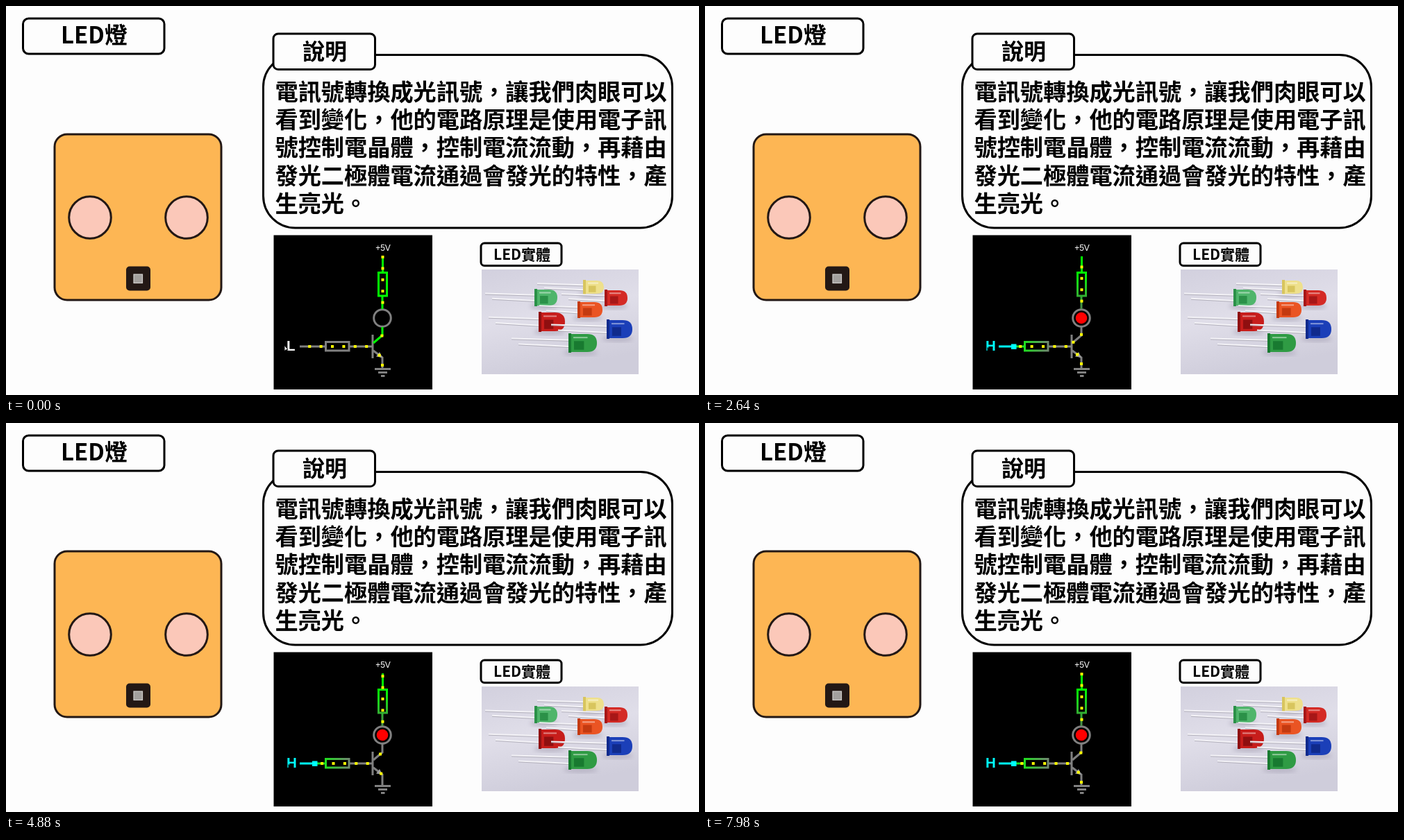
Recreate the animation shown at these times as an HTML page. Size 998x561 px, loop 8 s.

```html
<!DOCTYPE html>
<html lang="zh-TW">
<head>
<meta charset="utf-8">
<style>
html, body { margin: 0; width: 100%; height: 100%; overflow: hidden; background: #fdfdfd; }
svg { display: block; width: 100%; height: 100%; }
.cjk { font-family: "Noto Sans CJK TC", "Noto Sans CJK", sans-serif; font-weight: 700; }
.box { fill: #fdfdfd; stroke: #000; stroke-width: 3; }
.face { stroke: #231815; stroke-width: 3; }
.wire { fill: none; stroke-width: 3; }
.grey { stroke: #808080; }
.sim { font-family: "Liberation Sans", Arial, sans-serif; }
</style>
</head>
<body>
<svg viewBox="0 0 998 561" preserveAspectRatio="none">
  <defs>
    <linearGradient id="drop" gradientUnits="userSpaceOnUse" x1="0" y1="384" x2="0" y2="437">
      <stop offset="0" stop-color="#0f0"/><stop offset=".6" stop-color="#2fb52f"/><stop offset="1" stop-color="#4c8a4c"/>
    </linearGradient>
    <linearGradient id="base" gradientUnits="userSpaceOnUse" x1="460" y1="0" x2="494" y2="0">
      <stop offset="0" stop-color="#1fe01f"/><stop offset="1" stop-color="#708870"/>
    </linearGradient>
    <linearGradient id="table" x1="0" y1="0" x2=".3" y2="1">
      <stop offset="0" stop-color="#d2d0de"/><stop offset=".5" stop-color="#e0dee9"/><stop offset="1" stop-color="#cfcddb"/>
    </linearGradient>
    <filter id="soft"><feGaussianBlur stdDeviation="3"/></filter>
    <clipPath id="photoClip"><path d="M685 380H911V531H685Z"/></clipPath>
  </defs>

  <rect width="998" height="561" fill="#fdfdfd"/>
  <rect class="box" x="24.5" y="18" width="203.5" height="51" rx="8"/>
  <text class="cjk" x="79" y="54" font-size="33">LED燈</text>

  <rect class="face" x="70" y="185" width="240" height="239" rx="18" fill="#fdb654"/>
  <circle class="face" cx="121" cy="305" r="30.3" fill="#fbc8b9"/>
  <circle class="face" cx="260" cy="305" r="30.3" fill="#fbc8b9"/>
  <rect x="173" y="375.5" width="35" height="35" rx="5" fill="#231815"/>
  <rect x="184" y="387" width="12.5" height="12.5" fill="#a3a09e" stroke="#d0cecc" stroke-width="1.2"/>

  <rect class="box" x="370.5" y="70.5" width="589" height="249.5" rx="46"/>
  <rect class="box" x="385" y="40" width="146.5" height="51.5" rx="7"/>
  <text class="cjk" x="427" y="77" font-size="32">說明</text>
  <g id="body" class="cjk" font-size="33.2"></g>

  <rect class="box" x="684" y="342" width="116" height="32.5" rx="5"/>
  <text class="cjk" x="702" y="365.5" font-size="21">LED實體</text>
  <g id="photo" clip-path="url(#photoClip)"><rect x="685" y="380" width="226" height="151" fill="url(#table)"/></g>

  <rect x="385.5" y="330.5" width="228.5" height="222.5"/>
  <text class="sim" x="543" y="353" font-size="12" fill="#fff" text-anchor="middle">+5V</text>
  <g class="wire grey">
    <path d="M494 491H527M528 474V508M529 497L542 507V523"/>
    <path d="M531 523.5H554M536 528.5H549M540 533.5H545.5"/>
    <circle cx="542" cy="450" r="12.3"/>
  </g>
  <path d="M542 507L533 505.5L538 499Z" fill="#a0a0a0"/>
  <g class="wire">
    <path d="M542.5 361V384" stroke="#0f0"/>
    <path id="load" d="M536.5 384.5H548.5V418H536.5ZM542 418V437"/>
    <path id="collector" d="M542 463V475L529 486"/>
    <path id="input" d="M423 491H445"/>
    <path id="lead" d="M445 491H460"/>
    <path id="resistor" d="M460.5 484.5H494V497H460.5Z"/>
  </g>
  <circle id="glow" cx="542" cy="450" r="8.3" fill="#f00"/>
  <g id="dots" fill="#ff0"></g>
  <rect id="post" x="441" y="487.5" width="7.5" height="7.5" fill="#0ff"/>
  <text id="level" class="sim" x="404" y="497" font-size="20.5" font-weight="700"></text>
  <path id="cursor" d="M0 0V8L2 6.3L5 6Z" stroke-width=".8"/>
  <circle id="ring" cx="407" cy="492" fill="none" stroke="#c00" stroke-width="1.3"/>
</svg>
<script>
const $ = id => document.getElementById(id);
const set = (id, attrs) => { for (const k in attrs) $(id).setAttribute(k, attrs[k]); };

const lines = ['電訊號轉換成光訊號，讓我們肉眼可以', '看到變化，他的電路原理是使用電子訊',
  '號控制電晶體，控制電流流動，再藉由', '發光二極體電流通過會發光的特性，產', '生亮光。'];
$('body').innerHTML = lines.map((s, i) => `<text x="387.5" y="${136 + i * 40.2}">${s}</text>`).join('');

// Loose LEDs: left, top, width, height, lead start, body colour, shade
const leds = [
  [831, 395, 30, 21, 765, '#eee08c', '#d8c55e'],
  [761, 408, 33, 25, 690, '#4fb56b', '#2b9148'],
  [862, 409, 33, 24, 800, '#d42a25', '#a81717'],
  [823, 426, 36, 24, 768, '#ea5423', '#c43a10'],
  [767, 441, 38, 29, 695, '#c71d1b', '#8f0f10'],
  [865, 452, 37, 28, 785, '#1b3fb8', '#102a8c'],
  [810, 472, 41, 28, 728, '#2f9b44', '#187a30']
];
$('photo').insertAdjacentHTML('beforeend', leds.map(([x, y, w, h, from, fill, shade]) => `
  <ellipse cx="${x + w / 2 - 3}" cy="${y + h}" rx="${w * .6}" ry="5" fill="#aaa6b8" opacity=".6" filter="url(#soft)"/>
  <path d="M${from} ${y + h * .3 - 1}L${x} ${y + h * .35}M${from + 10} ${y + h * .55}L${x} ${y + h * .68}" stroke="#f4f3f7" stroke-width="2"/>
  <path d="M${from} ${y + h * .3 + .5}L${x} ${y + h * .35 + 1.5}M${from + 10} ${y + h * .55 + 1.5}L${x} ${y + h * .68 + 1.5}" stroke="#a9a6b2" stroke-width=".8"/>
  <path d="M${x} ${y + 1}h${w - h / 2}q${h / 2} 0 ${h / 2} ${h / 2 - 1}t${-h / 2} ${h / 2 - 1}h${h / 2 - w}z" fill="${fill}"/>
  <path d="M${x} ${y}h4v${h}h-4zM${x + 8} ${y + h * .4}h${w * .35}v${h * .45}h${-w * .35}z" fill="${shade}"/>
  <path d="M${x + 7} ${y + h * .22}h${w * .5}" stroke="#fff" stroke-width="2" opacity=".45"/>`).join(''));

const GAP = 16.4, SPEED = 9.6, ON = 1.14;
const mod = (a, n) => ((a % n) + n) % n;

// Dots spaced along a polyline, shifted by a phase
function dotsOn(pts, phase) {
  let out = '', d = mod(phase, GAP);
  for (let i = 1; i < pts.length; i++) {
    const [x0, y0] = pts[i - 1], [x1, y1] = pts[i];
    const len = Math.hypot(x1 - x0, y1 - y0);
    for (; d <= len; d += GAP) {
      const x = x0 + (x1 - x0) * d / len, y = y0 + (y1 - y0) * d / len;
      out += `<rect x="${x - 2}" y="${y - 2}" width="4" height="4"/>`;
    }
    d -= len;
  }
  return out;
}

function draw(t) {
  const on = t >= ON, flow = on ? (t - ON) * SPEED : 0;
  set('load', { stroke: on ? 'url(#drop)' : '#0f0' });
  set('collector', { stroke: on ? '#808080' : '#0f0' });
  set('input', { stroke: on ? '#0ff' : '#808080' });
  set('lead', { stroke: on ? '#1fe01f' : '#808080' });
  set('resistor', { stroke: on ? 'url(#base)' : '#808080' });
  set('glow', { opacity: +on });
  set('post', { opacity: +on });
  set('level', { fill: on ? '#0ff' : '#fff' });
  $('level').textContent = on ? 'H' : 'L';

  const drift = on ? (t - ON) * .4 : 0;
  $('dots').innerHTML =
    dotsOn([[542.5, 362], [542.5, 437]], flow) +
    dotsOn([[542, 463], [542, 475], [529, 486]], flow - 3.6) +
    dotsOn([[529, 497], [542, 507], [542, 521]], flow - 5.4) +
    dotsOn([[on ? 450 : 434, 491], [525, 491]], (on ? 3.6 : 3.2) + drift);

  const k = Math.min(1, t / .6), ease = k * k * (3 - 2 * k);
  set('cursor', {
    transform: `translate(${401 + 6 * ease} ${489.5 + 3 * ease})`,
    fill: on ? '#000' : '#fff', stroke: '#000', opacity: +(t < 7.3)
  });
  const p = (t - ON) / .65;
  set('ring', { r: 5 + 8.5 * Math.max(0, Math.min(1, p)), opacity: p >= 0 && p < 1 ? 1 - .6 * p : 0 });
}

const start = performance.now();
function tick() {
  draw((performance.now() - start) % 8000 / 1000);
  requestAnimationFrame(tick);
}
tick();
</script>
</body>
</html>
```
